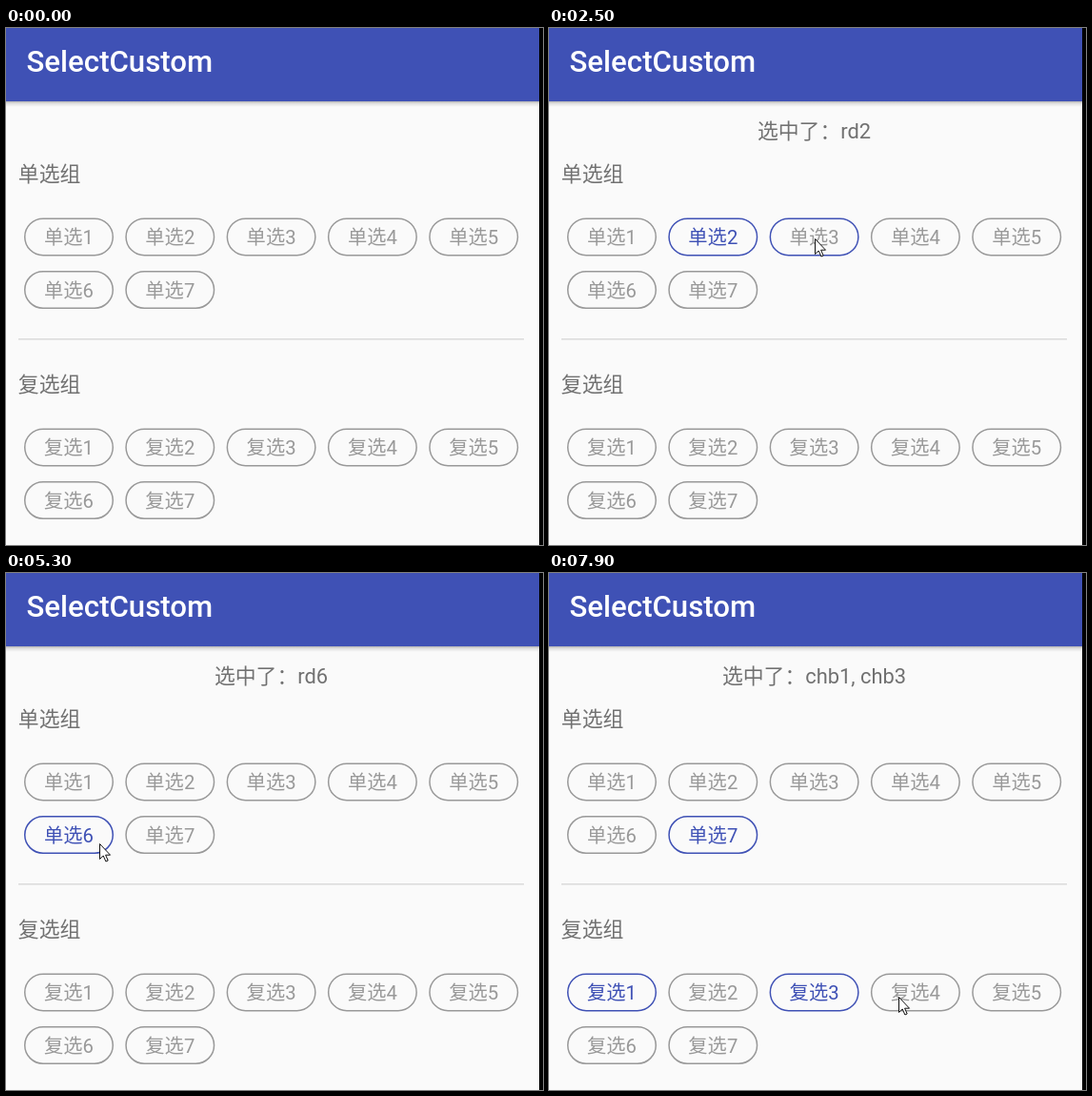
An HTML page that plays this animation: 564 by 543 pixels, repeating every 8000 ms.

```html
<!DOCTYPE html>
<html lang="zh-CN">
<head>
<meta charset="utf-8">
<title>SelectCustom</title>
<style>
  html, body { margin: 0; width: 100%; height: 100%; overflow: hidden; background: #fafafa; }
  svg { display: block; width: 564px; height: 543px; }
  text { font: 21.85px Roboto, "Noto Sans CJK SC", "Noto Sans CJK", sans-serif; fill: #717171; }
  .title { font-size: 31.2px; font-weight: 500; fill: #fff; }
  .chip rect { fill: none; stroke: #999; stroke-width: 1.5; }
  .chip text { font-size: 20.3px; fill: #999; text-anchor: middle; }
  .pressed rect, .on rect { stroke: #3f51b5; }
  .chip.on text { fill: #3f51b5; }
  #status { text-anchor: middle; }
</style>
</head>
<body>
<svg viewBox="0 0 564 543" lang="zh-CN">
  <defs>
    <linearGradient id="shade" x2="0" y2="1">
      <stop offset="0" stop-color="#000" stop-opacity=".28"/>
      <stop offset=".4" stop-color="#000" stop-opacity=".1"/>
      <stop offset="1" stop-color="#000" stop-opacity="0"/>
    </linearGradient>
  </defs>
  <rect width="564" height="543" fill="#fafafa"/>
  <rect y="77" width="560" height="6" fill="url(#shade)"/>
  <rect width="560" height="77" fill="#3f51b5"/>
  <text class="title" x="21.5" y="45.5">SelectCustom</text>
  <text id="status" x="278.5" y="116"></text>
  <text x="12.8" y="161">单选组</text>
  <text x="12.8" y="382">复选组</text>
  <rect x="13" y="326" width="531" height="1.6" fill="#dcdcdc"/>
  <g id="chips"></g>
  <rect x="560" width="4" height="543" fill="#000"/>
  <path id="cursor" d="M.5 .5V16.5L4.2 13L6.9 19L9.2 18L6.6 12.2H11.5Z" fill="#fff" stroke="#111"/>
</svg>
<script>
const LOOP = 8000, STEP = 100, ENTER = 300;
const $ = id => document.getElementById(id);

function add(parent, tag, attrs, text = "") {
  const el = document.createElementNS("http://www.w3.org/2000/svg", tag);
  for (const key in attrs) el.setAttribute(key, attrs[key]);
  el.textContent = text;
  return parent.appendChild(el);
}

const chips = {};
function addGroup(name, id, top) {
  for (let i = 0; i < 7; i++) {
    const x = 19 + (i % 5) * 106.3;
    const y = top + Math.floor(i / 5) * 55.6;
    const g = chips[id + (i + 1)] = add($("chips"), "g", { class: "chip" });
    add(g, "rect", { x: x + .75, y: y + .75, width: 92.5, height: 38.5, rx: 19.25 });
    add(g, "text", { x: x + 47, y: y + 28 }, name + (i + 1));
  }
}
addGroup("单选", "rd", 199.4);
addGroup("复选", "chb", 420.4);

// chip, time of selection, how long it is held before
const taps = [
  ["rd1", 1300, 100], ["rd2", 2100, 100], ["rd3", 2600, 100], ["rd4", 4300, 100],
  ["rd6", 5300, 0], ["rd7", 5900, 100], ["chb1", 6900, 100], ["chb3", 7700, 100]
];

// pointer moves: start, end, x, y
const moves = [
  [300, 1000, 90, 212], [1400, 1700, 169, 225], [2100, 2500, 279, 221],
  [2600, 2800, 227, 257], [2800, 3400, 85, 278], [3700, 4100, 386, 227],
  [4300, 4600, 95, 292], [4600, 5000, 80, 283], [5200, 5300, 98, 284],
  [5300, 5600, 158, 281], [5900, 6000, 160, 305], [6100, 6600, 93, 439],
  [6900, 7500, 288, 439], [7700, 7900, 367, 445]
];

function ease(k) {
  k = Math.min(1, Math.max(0, k));
  return k * k * (3 - 2 * k);
}

function pointerAt(t) {
  let x = 473, y = 81;
  for (const [from, to, toX, toY] of moves) {
    const k = ease((t - from) / (to - from));
    x += (toX - x) * k;
    y += (toY - y) * k;
  }
  return [Math.round(x), Math.round(y)];
}

function render(t) {
  const held = taps.find(([, at, hold]) => t >= at - hold && t < at);
  const done = taps.filter(([, at]) => t >= at).map(([id]) => id);
  const radio = done.filter(id => id.startsWith("rd")).slice(-1);
  const checks = done.filter(id => id.startsWith("chb"));
  const on = [...radio, ...checks];

  for (const id in chips) {
    const state = on.includes(id) ? " on" : held && held[0] === id ? " pressed" : "";
    chips[id].setAttribute("class", "chip" + state);
  }
  const picked = checks.length ? checks : radio;
  $("status").textContent = picked.length ? "选中了：" + picked.join(", ") : "";
  $("cursor").style.display = t < ENTER ? "none" : "";
  $("cursor").setAttribute("transform", `translate(${pointerAt(t)})`);
}

const start = performance.now();
function tick() {
  const t = (performance.now() - start) % LOOP;
  render(Math.floor(t / STEP) * STEP);
  requestAnimationFrame(tick);
}
tick();
</script>
</body>
</html>
```
